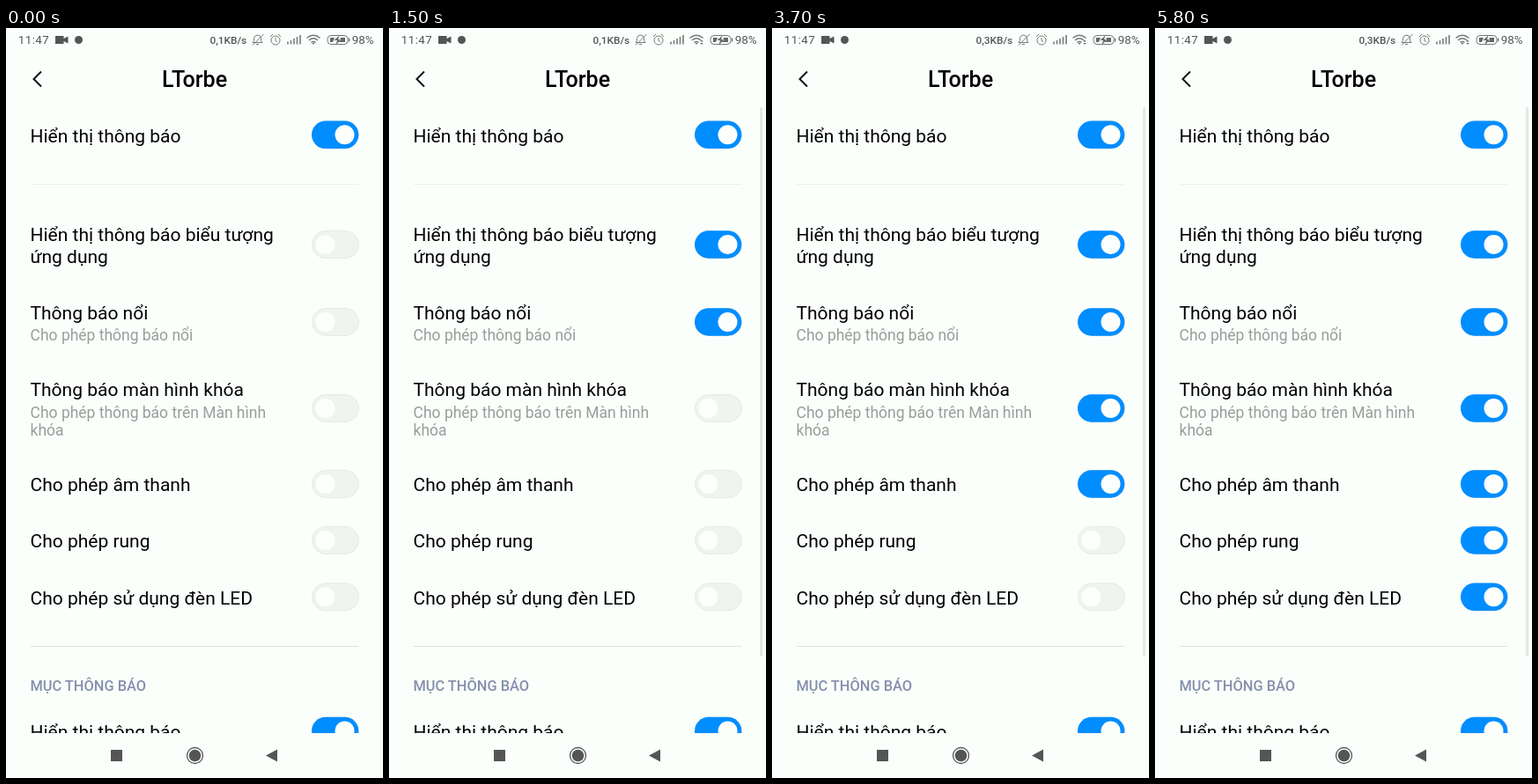
An HTML page that plays this animation: 428x852 px, repeating every 6.1 s.

```html
<!DOCTYPE html>
<html lang="vi">
<head>
<meta charset="utf-8">
<style>
  html, body { margin: 0; height: 100%; overflow: hidden; background: #fbfffb; }
  svg { display: block; width: 428px; height: 852px; font-family: Roboto, sans-serif; }
  .main { font-size: 21px; }
  .sub { font-size: 17.48px; fill: #9a9d9a; }
  .status { font-size: 13.4px; fill: #555; }
  .line { fill: none; stroke: #777; }
  #speed { font-size: 11.8px; font-weight: 500; }
</style>
</head>
<body>
<svg viewBox="0 0 428 852">
  <clipPath id="page"><rect y="90" width="428" height="711"/></clipPath>

  <g class="status">
    <text x="13.8" y="18" letter-spacing=".4">11:47</text>
    <path d="M56 9h9.5v3l5-2.5v8l-5-2.5v3H56z"/>
    <circle cx="82.5" cy="13.5" r="4.5"/>
    <text id="speed" x="231.5" y="18"></text>
    <text x="392.8" y="18">98%</text>
  </g>
  <g class="line">
    <path d="M280 16.5h11l-1.5-2v-3q-.5-3-4-3.5q-3.500.5-4 3.5v3zM284 18.5h3M280 19.5L292.5 7"/>
    <circle cx="306" cy="14" r="5"/>
    <path d="M306 11v3.5l2 1M300 10l3-3M312 10l-3-3"/>
    <path d="M320 18.5v-3M323.5 18.5V14M327 18.5V12M330.5 18.5V10M334 18.5V8" stroke-width="1.8" stroke="#858785"/>
    <path d="M341.5 11.5q7.5-6.5 15 0M344 14q5-4.5 10 0M346.5 16.5q2.5-2 5 0" stroke-width="1.5"/>
    <rect x="365" y="8.5" width="23" height="10" rx="4"/>
    <path d="M389.5 11.5v4" stroke-width="1.5"/>
  </g>
  <path d="M347.5 17h3l-1.5 2zM368 11h5l-2 5h-3zM380 11h5v5h-7zM378.5 8.5l-6 5.5h3.5l-1.5 5 6-6h-3.5z" fill="#666"/>
  <path id="activity" d="M353.5 15.5l1.5-2 1.5 2zM353.5 17l1.5 2 1.5-2z" fill="#555"/>

  <path d="M40 49.5l-8.5 8.5 8.5 8.5" fill="none" stroke="#111" stroke-width="2"/>
  <text x="214" y="67" font-size="25" font-weight="500" text-anchor="middle">LTorbe</text>

  <g clip-path="url(#page)">
    <path d="M28 177.5h372" stroke="#eceeec"/>
    <path d="M28 702.5h372" stroke="#dfe2df"/>
    <g class="main" transform="translate(27.5)">
      <text y="129.6">Hiển thị thông báo</text>
      <text y="242">Hiển thị thông báo biểu tượng</text>
      <text y="266.5">ứng dụng</text>
      <text y="330.6">Thông báo nổi</text>
      <text y="418.3">Thông báo màn hình khóa</text>
      <text y="526.3">Cho phép âm thanh</text>
      <text y="590.4">Cho phép rung</text>
      <text y="654.8">Cho phép sử dụng đèn LED</text>
      <text y="806.6">Hiển thị thông báo</text>
    </g>
    <g class="sub" transform="translate(27.6)">
      <text y="355">Cho phép thông báo nổi</text>
      <text y="442.6">Cho phép thông báo trên Màn hình</text>
      <text y="463">khóa</text>
    </g>
    <text x="27.5" y="753" font-size="16.4" font-weight="500" fill="#8490ac">MỤC THÔNG BÁO</text>
    <g id="switches"></g>
    <rect id="scrollbar" x="421" y="90" width="3.2" height="624" rx="1" fill="#e5e8e5"/>
  </g>

  <g fill="#555">
    <rect x="119" y="820" width="13" height="13"/>
    <circle cx="214.5" cy="826.5" r="6.8"/>
    <circle cx="214.5" cy="826.5" r="9" fill="none" stroke="#555" stroke-width="1.3"/>
    <path d="M295 826.5l13-7v14z"/>
  </g>
</svg>
<script>
  const LOOP = 6100, STEP = 100, FADE = 210, SLIDE = 120;
  const get = id => document.getElementById(id);
  const clamp = v => Math.max(0, Math.min(1, v));

  // [centre y, time it is switched on]
  const switches = [
    [121.3, -1000], [246, 450], [334, 1150], [432, 1950],
    [518, 2750], [582, 4650], [646.3, 3950], [798.5, -1000]
  ].map(([y, start]) => {
    const group = document.createElementNS('http://www.w3.org/2000/svg', 'g');
    group.setAttribute('transform', `translate(347 ${y - 16})`);
    group.innerHTML = `
      <rect x=".5" y=".5" width="53" height="31" rx="15.5" fill="#f0f3ef" stroke="#e7eae6"/>
      <rect y=".3" width="53.3" height="31.4" rx="15.7" fill="#008dff"/>
      <circle cy="16" r="11" fill="#fcfffc"/>`;
    get('switches').append(group);
    const [, track, knob] = group.children;
    return { start, track, knob };
  });

  function draw(now) {
    const t = Math.floor(now % LOOP / STEP) * STEP;
    for (const { start, track, knob } of switches) {
      const slide = clamp((t - start) / SLIDE);
      track.setAttribute('opacity', clamp((t - start) / FADE));
      knob.setAttribute('cx', 15.5 + 22 * slide * (2 - slide));
    }
    const visible = t >= 1000 ? 'visible' : 'hidden';
    get('scrollbar').setAttribute('visibility', visible);
    get('activity').setAttribute('visibility', visible);
    get('speed').textContent = t < 3300 ? '0,1KB/s' : '0,3KB/s';
  }

  const begin = performance.now();
  function tick() {
    draw(performance.now() - begin);
    requestAnimationFrame(tick);
  }
  tick();
</script>
</body>
</html>
```
